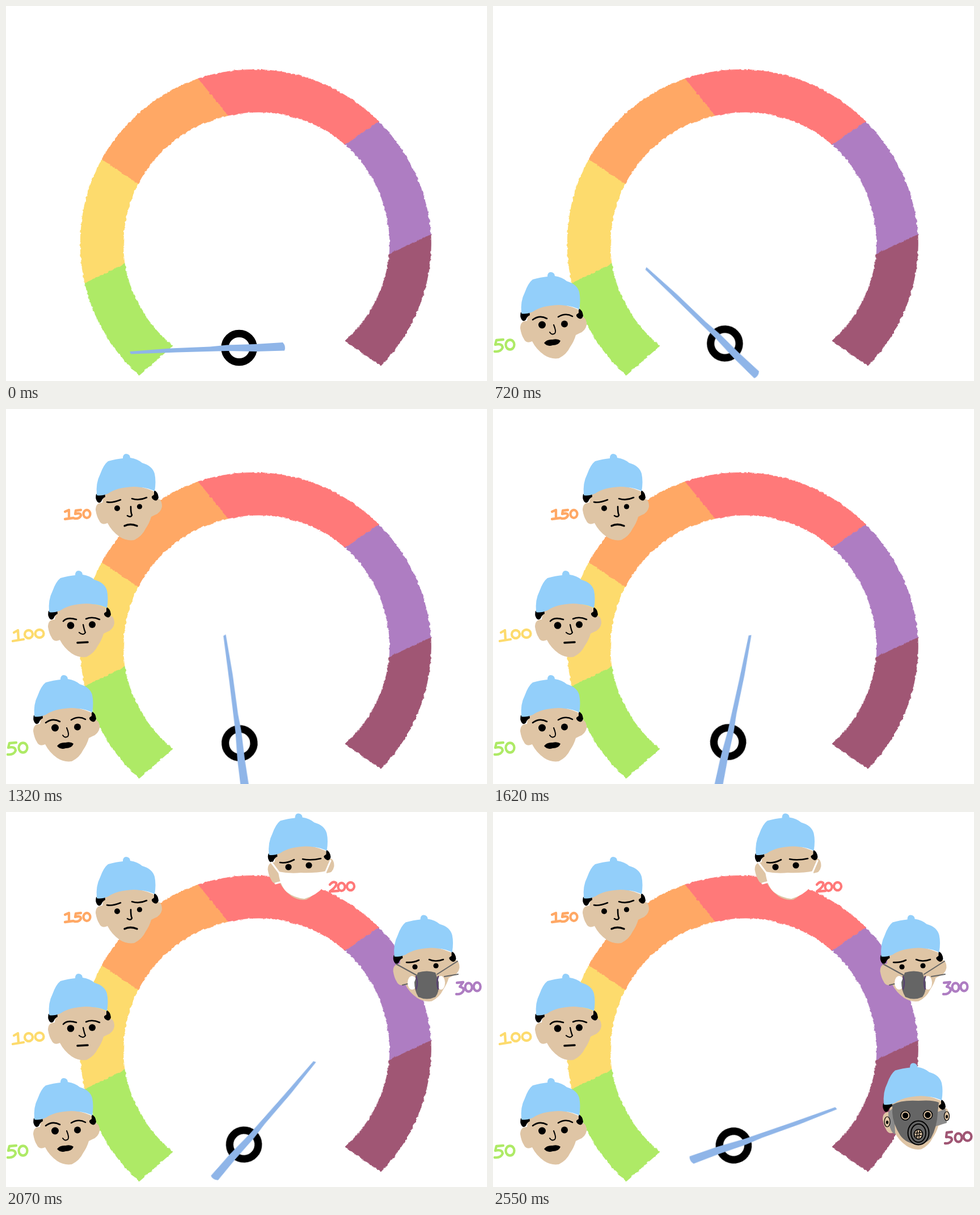
An HTML page that plays this animation: 848 by 661 pixels, repeating every 3600 ms.

```html
<!DOCTYPE html>
<html lang="en">
<head>
<meta charset="utf-8">
<title>Air quality gauge</title>
<style>
  html, body { margin: 0; width: 100%; height: 100%; overflow: hidden; background: #fff; }
  svg { display: block; width: 100%; height: 100%; }
  .needle { transform-box: view-box; transform-origin: 418.8px 596.2px; }
  .stage { opacity: 0; }
  .line { fill: none; stroke: #000; stroke-width: 2.6; stroke-linecap: round; stroke-linejoin: round; }
  .num { fill: none; stroke-width: 4.3; stroke-linecap: round; stroke-linejoin: round; }
</style>
</head>
<body>
<svg viewBox="0 0 848 661" xmlns="http://www.w3.org/2000/svg">
  <defs>
    <filter id="chalk" filterUnits="userSpaceOnUse" x="0" y="0" width="848" height="661" color-interpolation-filters="sRGB">
      <feTurbulence type="fractalNoise" baseFrequency=".16" numOctaves="2" seed="4"/>
      <feDisplacementMap in="SourceGraphic" scale="4.5" xChannelSelector="R" yChannelSelector="G"/>
    </filter>
    <g id="head">
      <path fill="#dfc5a5" d="M62 535L60 555Q48 555 48 568Q50 580 54 586Q58 596 69 591Q76 605 90 615Q102 623 116 621Q130 614 136 601Q143 591 146 580L152 577Q163 573 165 562Q165 549 157 548L150 535Q105 515 62 535Z"/>
      <path d="M49 540L64 537L65 545Q60 547 58 553Q53 558 50 552Q47 547 49 540ZM151 533Q158 536 159 546Q157 553 152 551Q146 548 147 544L151 541Z"/>
      <path fill="#93cffa" d="M50 542Q48 520 56 505Q62 488 70 482Q84 478 96 477Q96 469 102 469Q109 470 109 476Q122 478 130 485Q148 490 152 504Q155 518 152 535Q140 528 115 527Q85 528 70 539Q58 544 50 542Z"/>
    </g>
  </defs>
  <g id="dial" filter="url(#chalk)"></g>
  <g class="needle" id="needle">
    <circle cx="411" cy="602.5" r="25.2" fill="none" stroke="#000" stroke-width="13.2"/>
    <path fill="#8fb5e8" d="M218 609L289 603.5L360 600.5L390 597.5L440 596L488 593Q494 600 491 607.5L440 609L390 608L300 610.5L220 613.5Z"/>
  </g>
  <g id="faces"></g>
</svg>
<script>
const LOOP = 3600, FRAME = 30;
const color = {
  green: '#aeea66', yellow: '#fddb6d', orange: '#ffa865',
  red: '#ff7979', purple: '#ae7dc2', maroon: '#a05674'
};
const $ = id => document.getElementById(id);

// Borders between dial bands: outer x, y, inner x, y
const borders = [
  [235, 651, 294, 599], [139, 488, 209, 454], [169, 270, 233, 313],
  [339, 128, 392, 193], [657, 204, 598, 244], [749, 403, 676, 437],
  [661, 634, 598, 590]
];
$('dial').innerHTML = Object.values(color).map((c, i) => {
  const [ax, ay, bx, by] = borders[i], [cx, cy, dx, dy] = borders[i + 1];
  return `<path fill="${c}" stroke="${c}" stroke-width=".8" stroke-linejoin="round"
    d="M${ax} ${ay}A309 309 0 0 1 ${cx} ${cy}L${dx} ${dy}A235 235 0 0 0 ${bx} ${by}Z"/>`;
}).join('');

const line = (d, attrs = '') => `<path class="line" d="${d}" ${attrs}/>`;
const shape = (d, fill = '#000') => `<path d="${d}" fill="${fill}"/>`;
const dot = (x, y, rx, ry = rx, fill = '#000') =>
  `<ellipse cx="${x}" cy="${y}" rx="${rx}" ry="${ry}" fill="${fill}"/>`;
const ring = (x, y, rx, ry = rx, w = 2) =>
  `<ellipse class="line" cx="${x}" cy="${y}" rx="${rx}" ry="${ry}" style="stroke-width:${w}"/>`;
const zero = (x, y, rx, ry) =>
  `M${x - rx} ${y}a${rx} ${ry} 0 1 1 ${2 * rx} 0a${rx} ${ry} 0 1 1 ${-2 * rx} 0`;
const GREY = '#656565', SKIN = '#dfc5a5';

const faces = [
  {
    label: 50, ink: color.green, at: [0, 0],
    num: 'M18 588L6 589L4 597Q16 594 17 602Q14 610 3 609' + zero(30, 597, 7.5, 8.5),
    art: line('M70 553Q82 544 95 551M115 548Q128 540 140 547') +
      dot(86.5, 562, 6.5) + dot(126, 560.5, 6) +
      line('M107 562Q112 574 109 577Q104 581 100 575', 'style="stroke-width:2"') +
      shape('M90 594Q95 587 105 588Q114 586 119 590Q116 598 105 598Q96 601 90 594Z')
  },
  {
    label: 100, ink: color.yellow, at: [26, -184],
    num: 'M14 394L21 390L22 407M12 409L31 406' + zero(40, 397, 7, 7) + zero(59, 396, 7.5, 7),
    art: line('M101 374Q108 366 124 371M141 370Q152 365 165 371') +
      dot(114, 381.5, 6.3) + dot(152, 380, 6) +
      line('M136 380Q138 390 140 394Q136 400 129 394', 'style="stroke-width:2.2"') +
      line('M126 412L144 411', 'style="stroke-width:3.6"')
  },
  {
    label: 150, ink: color.orange, at: [110, -390],
    num: 'M104 181L111 178L111 193M104 194L119 192M132 178L123 179L122 185Q132 182 132 188Q129 194 121 193' +
      zero(142.5, 185, 6, 7),
    art: line('M178 164Q187 166 202 160M222 158Q235 162 248 156') +
      dot(196, 175, 5) + dot(235.5, 172, 4.6) +
      line('M220 172Q220 184 222 187Q220 192 214 188') +
      line('M209 206Q219 201 231 206', 'style="stroke-width:3.4"')
  },
  {
    label: 200, ink: color.red, at: [413.5, -466.5],
    num: 'M571 128Q577 121 582 125Q584 131 571 140L586 139' + zero(591.5, 132, 6, 7) + zero(607.5, 131, 6.5, 7),
    art: line('M483 89Q495 91 508 84M523 83Q537 86 555 82') +
      dot(498, 97, 5.6) + dot(534, 94, 5.6) +
      shape('M480 105Q500 109 520 107Q545 108 565 104Q566 122 560 132Q547 147 526 153Q508 151 495 141Q483 130 480 105Z', '#fff') +
      line('M468 89L483 109M572 86L563 107M475 126L486 123M563 110L576 107', 'style="stroke:#fff;stroke-width:3"')
  },
  {
    label: 300, ink: color.purple, at: [634.5, -287.5],
    num: 'M795 301L806 300L800 308Q809 310 806 316Q802 322 794 321' + zero(815.5, 309, 6, 7.5) + zero(830.5, 308, 6, 7.5),
    art: line('M706 265Q718 266 728 261M746 260Q757 265 771 260') +
      dot(721, 273, 4.6) + dot(758, 271, 4.6) +
      line('M688 268L728 290M796 263L760 286M699 305L712 302M773 290L797 286', `style="stroke:${GREY};stroke-width:2"`) +
      dot(716, 301, 8, 12, '#fff') + dot(767, 301, 7, 12, '#fff') +
      shape('M726 283Q742 278 757 283L763 300Q764 318 757 326Q742 333 727 326Q720 315 720 300Z', GREY) +
      line('M723 290Q727 301 723 312M762 290Q758 301 762 312', 'style="stroke:#574070;stroke-width:2.4"')
  },
  {
    label: 500, ink: color.maroon, at: [639, -26.5],
    num: 'M809 564L800 565L799 573Q809 572 809 578Q806 585 797 584' + zero(820.5, 574, 6, 7.5) + zero(836.5, 572, 7, 7.5),
    art: shape('M697 529L707 520L709 568Q697 564 697 529ZM783 529L798 523L800 548L780 554Z', '#8b8b8b') +
      dot(695, 546, 5, 9, SKIN) + dot(800, 536, 4.5, 8, SKIN) +
      ring(695, 546, 5, 9, 1.2) + ring(800, 536, 4.5, 8, 1.2) +
      dot(695, 547, 2.2, 3) + dot(800, 537, 2, 3) +
      shape('M704 516Q720 507 750 509Q775 507 786 512L784 530Q783 555 772 575Q762 586 748 586Q728 584 718 570Q705 550 704 530Z', GREY) +
      [[727, 535], [766.5, 534]].map(([x, y]) => dot(x, y, 8, 8, SKIN) + ring(x, y, 8, 8, 1.6) + dot(x, y, 5.2)).join('') +
      ring(750, 565.5, 18.5, 21) + ring(750, 566, 13, 16) +
      dot(750, 568, 7, 8, SKIN) + ring(750, 568, 7.5, 8.5, 1.8) +
      line('M748 562L747 574M752 562L751 574M745 566L755 565M745 571L755 570', 'style="stroke-width:1.6"')
  }
];

$('faces').innerHTML = faces.map(f => `<g class="stage">
  <use href="#head" x="${f.at[0]}" y="${f.at[1]}"/>${f.art}
  <path class="num" role="img" aria-label="${f.label}" stroke="${f.ink}" d="${f.num}"/></g>`).join('');

// Needle poses: time in ms, degrees clockwise
const poses = [[0, 0], [390, 25], [990, 63.5], [1320, 84.7], [1830, 117.8], [2070, 133.1], [2550, 162.6], [LOOP, 162.6]];
const timing = { duration: LOOP, iterations: Infinity };
$('needle').animate(poses.map(([t, deg], i) => ({
  offset: t / LOOP,
  transform: `rotate(${deg}deg)`,
  easing: i < poses.length - 1 ? `steps(${(poses[i + 1][0] - t) / FRAME})` : 'linear'
})), timing);

document.querySelectorAll('.stage').forEach((g, i) => {
  const show = (390 + 420 * i) / LOOP;
  g.animate([
    { offset: 0, opacity: 0, easing: 'step-end' },
    { offset: show, opacity: 1 },
    { offset: 1, opacity: 1 }
  ], timing);
});
</script>
</body>
</html>
```
